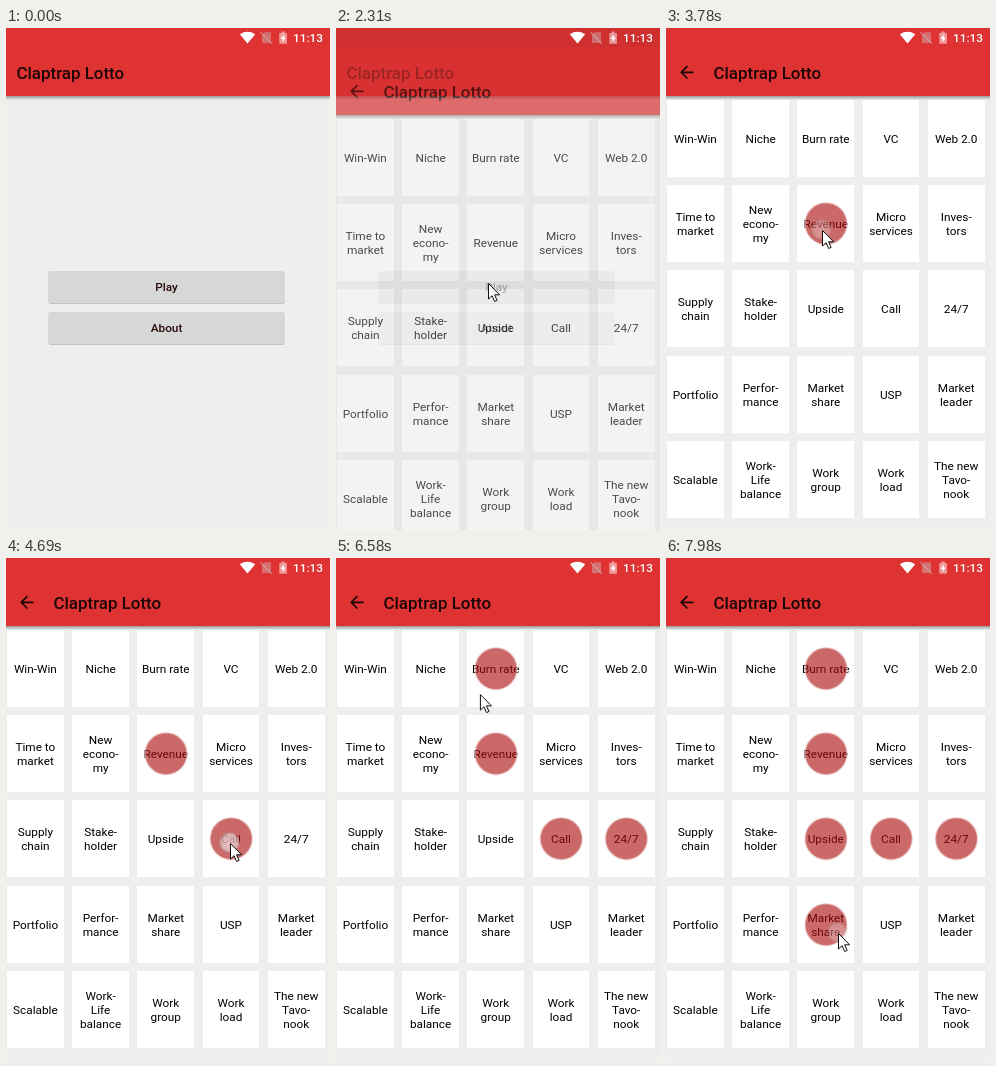
These frames come from a looping animation (324x502 px, 8000 ms). An HTML page:

```html
<!DOCTYPE html>
<html lang="en">
<head>
<meta charset="utf-8">
<title>Claptrap Lotto</title>
<style>
  html, body { margin: 0; width: 100%; height: 100%; overflow: hidden; background: #eee; }
  svg { display: block; width: 100vw; height: 100vh; }
  text { font: 11.8px Roboto, sans-serif; fill: #000; text-anchor: middle; }
  .title { font-size: 16.9px; font-weight: 500; fill: #1c0606; text-anchor: start; }
  .label { font-weight: 500; fill: #2b0808; }
  .clock { font-weight: 500; fill: #fff; }
  .bar { fill: #df3333; }
  .paper { fill: #eee; }
  .cell { fill: #fff; }
  .mark { fill: rgba(172, 14, 14, .62); stroke: rgba(235, 200, 200, .6); stroke-width: 1.5; }
</style>
</head>
<body>
<svg id="stage" viewBox="0 0 324 502">
  <defs>
    <linearGradient id="fade" x2="0" y2="1">
      <stop offset="0" stop-opacity=".36"/>
      <stop offset="1" stop-opacity="0"/>
    </linearGradient>
    <radialGradient id="glow">
      <stop offset="0" stop-color="#fff" stop-opacity=".6"/>
      <stop offset=".75" stop-color="#eee" stop-opacity=".55"/>
      <stop offset=".9" stop-color="#bbb" stop-opacity=".5"/>
      <stop offset="1" stop-color="#999" stop-opacity=".1"/>
    </radialGradient>
    <clipPath id="playShape"><rect x="42.5" y="243" width="236" height="32" rx="2"/></clipPath>
    <g id="header">
      <rect class="bar" width="324" height="68"/>
      <rect y="68" width="324" height="4" fill="url(#fade)"/>
    </g>
    <g id="button">
      <rect x="42.5" y="244" width="236" height="32" rx="2" fill="#000" opacity=".18"/>
      <rect x="42.5" y="243" width="236" height="32" rx="2" fill="#d6d7d7"/>
    </g>
  </defs>

  <g id="menu">
    <rect class="paper" width="324" height="502"/>
    <use href="#header"/>
    <text class="title" x="10.5" y="51">Claptrap Lotto</text>
    <use href="#button"/>
    <use href="#button" y="41"/>
    <circle id="ripple" cx="152" cy="258" clip-path="url(#playShape)"/>
    <text class="label" x="160.5" y="263">Play</text>
    <text class="label" x="160.5" y="304">About</text>
    <rect id="dim" width="324" height="502"/>
  </g>

  <g id="board">
    <rect class="paper" width="324" height="502"/>
    <g id="cells"></g>
    <use href="#header"/>
    <path transform="translate(10.7 34.2) scale(.844)" fill="#1c0606"
      d="M20 11H7.83l5.59-5.59L12 4l-8 8 8 8 1.41-1.41L7.83 13H20z"/>
    <text class="title" x="47.5" y="51">Claptrap Lotto</text>
    <g id="marks"></g>
  </g>

  <g id="status">
    <path d="M241.5 15.6L233.8 6.3Q241.5 1.4 249.2 6.3Z" fill="#fff"/>
    <path d="M258.8 4.2H265V15H256V7Z" fill="#cbb" opacity=".45"/>
    <path d="M254.5 4.2L266 15.8" stroke="#cbb" stroke-width="1.2" opacity=".6"/>
    <path d="M275.5 3.6h3.2v1.3h2.2v10.9h-7.6V4.9h2.2z" fill="#fff" opacity=".5"/>
    <path d="M277.7 6.3l-3 4.7h2v3.2l3-4.7h-2z" fill="#fff"/>
    <text class="clock" x="302" y="14">11:13</text>
  </g>

  <circle id="touch" r="10.5" fill="url(#glow)"/>
  <path id="cursor" d="M.5 .5V16l3.6-3.3 2.5 5.8 2.5-1.1-2.5-5.6h5z" fill="#fff" stroke="#111"/>
</svg>

<script>
const LOOP = 8000, TICK = 70, OPEN = 2262;
const $ = id => document.getElementById(id);
const clamp = v => Math.max(0, Math.min(1, v));

const words = [
  'Win-Win', 'Niche', 'Burn rate', 'VC', 'Web 2.0',
  'Time to|market', 'New|econo-|my', 'Revenue', 'Micro|services', 'Inves-|tors',
  'Supply|chain', 'Stake-|holder', 'Upside', 'Call', '24/7',
  'Portfolio', 'Perfor-|mance', 'Market|share', 'USP', 'Market|leader',
  'Scalable', 'Work-|Life|balance', 'Work|group', 'Work|load', 'The new|Tavo-|nook'
];

// start, end, from x, y, to x, y
const moves = [
  [840, 980, 197, 457, 165, 375],
  [980, 1120, 165, 375, 144, 280],
  [1120, 1190, 144, 280, 152, 255],
  [2660, 2940, 152, 255, 159, 142],
  [3080, 3430, 159, 142, 156, 202],
  [3990, 4410, 156, 202, 224, 285],
  [4970, 5110, 224, 285, 294, 285],
  [5740, 6160, 294, 285, 142, 116],
  [6440, 7070, 142, 116, 157, 275],
  [7350, 7560, 157, 275, 172, 375]
];

// press, release, index of the word that gets marked
const taps = [
  [2030, 2170], [3640, 3710, 7], [4550, 4690, 13], [5320, 5460, 14],
  [6230, 6370, 2], [7210, 7280, 12], [7700, 7910, 17]
];

function add(parent, tag, attrs, content = '') {
  const node = document.createElementNS('http://www.w3.org/2000/svg', tag);
  for (const key in attrs) node.setAttribute(key, attrs[key]);
  node.textContent = content;
  return parent.appendChild(node);
}

// Cell edges snap to whole pixels, the centre stays exact.
function cellAt(i) {
  const left = 1 + 65.2 * (i % 5), x = Math.round(left);
  const y = Math.round(72 + 85.2 * Math.floor(i / 5));
  return { x, y, width: Math.round(left + 56.8) - x, center: left + 28.4 };
}

words.forEach((word, i) => {
  const { x, y, width, center } = cellAt(i), lines = word.split('|');
  add($('cells'), 'rect', { class: 'cell', x, y, width, height: 77 });
  lines.forEach((line, n) => add($('cells'), 'text',
    { x: center, y: y + 43 + 14 * (n - (lines.length - 1) / 2) }, line));
});

const marks = taps.slice(1).map(([, time, i]) => {
  const { y, center } = cellAt(i);
  return { time, node: add($('marks'), 'circle', { class: 'mark', cx: center + .2, cy: y + 38.7, r: 21 }) };
});

function cursorAt(t) {
  const [start, end, x0, y0, x1, y1] = moves.findLast(m => m[0] <= t) || moves[0];
  const p = clamp((t - start) / (end - start));
  const e = t < 1190 ? p : p * p * (3 - 2 * p);
  return [x0 + (x1 - x0) * e, y0 + (y1 - y0) * e];
}

function draw(t) {
  const [x, y] = cursorAt(t);
  $('cursor').setAttribute('transform', `translate(${x} ${y})`);
  $('cursor').setAttribute('opacity', t < 840 ? 0 : 1);

  const tap = taps.findLast(a => a[0] <= t);
  $('touch').setAttribute('transform', `translate(${x - .5} ${y - .5})`);
  $('touch').setAttribute('opacity', tap ? clamp(1 - (t - tap[1]) / 140) : 0);

  const press = clamp((t - 1960) / 300);
  $('ripple').setAttribute('r', 140 * press);
  $('ripple').setAttribute('opacity', press && .1 * clamp((2400 - t) / 200));

  // The board rises by 8% of the stage and fades in while the menu dims.
  const slide = clamp((t - OPEN) / 350), show = clamp((t - OPEN) / 200);
  $('board').setAttribute('transform', `translate(0 ${Math.floor(40 * (1 - slide) ** 5)})`);
  $('board').setAttribute('opacity', 1 - (1 - show) ** 4);
  $('dim').setAttribute('opacity', .3 * show);

  for (const { time, node } of marks) node.setAttribute('opacity', t < time ? 0 : 1);
}

const begin = performance.now();
function frame() {
  const t = (performance.now() - begin) % LOOP;
  draw(Math.floor(t / TICK) * TICK);
  requestAnimationFrame(frame);
}
frame();
</script>
</body>
</html>
```
